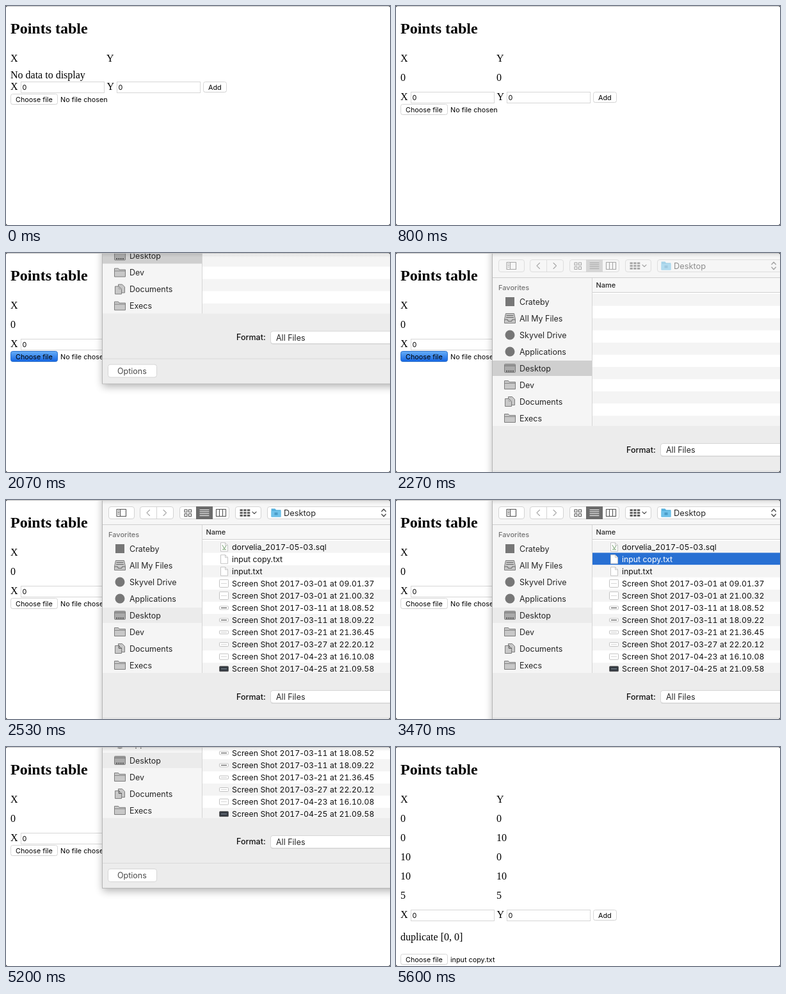
Animation, 600 px wide and 342 px high, one loop 7.34 s. Source, as an HTML page:

```html
<!DOCTYPE html>
<html lang="en">
<head>
<meta charset="utf-8">
<title>Points table</title>
<style>
html, body { margin: 0; width: 100%; height: 100%; overflow: hidden; background: #fff; }
svg { display: block; width: 100vw; height: 100vh; }
text { white-space: pre; }
.serif { font: 16px "Liberation Serif", "Times New Roman", serif; }
.serif .title { font-size: 24px; font-weight: bold; }
.ui { font: 10.8px Inter, sans-serif; }
.sheet { font: 12.5px Inter, sans-serif; fill: #262626; }
.files { font-size: 12.3px; fill: #111; }
.num { font-variant-numeric: tabular-nums; }
.small { font-size: 11px; }
.box { fill: #fff; stroke: #d6d6d6; }
.btn { fill: #fff; stroke: #d6d6d6; }
.pressed .btn { fill: url(#blue); stroke: #2a70cc; }
.line { fill: none; stroke: #555; stroke-width: 1.1; stroke-linecap: round; stroke-linejoin: round; }
.icon { fill: #c8c8c8; stroke: #7c7c7c; }
.tool { fill: #fff; stroke: #d3d3d3; }
.mid { fill: #6c6c6c; }
.midline { stroke: #fff; }
.side { fill: #ebebeb; }
.idle .tool { fill: #f6f6f6; stroke: #dedede; }
.idle .mid { fill: #d6d6d6; }
.idle .line { stroke: #a6a6a6; }
.idle .dim { opacity: .5; }
.idle .side { fill: #cfcfcf; }
</style>
</head>
<body>
<svg id="stage" viewBox="0 0 600 342" preserveAspectRatio="none"></svg>
<script>
const LOOP = 7340, SHEET_TRAVEL = 385, ROW = 19.05;

const rect = (x, y, w, h, attrs = '') =>
  `<rect x="${x}" y="${y}" width="${w}" height="${h}" ${attrs}/>`;
const text = (x, y, s, attrs = '') => `<text x="${x}" y="${y}" ${attrs}>${s}</text>`;
const path = (d, attrs = 'class="line"') => `<path d="${d}" ${attrs}/>`;
const group = (attrs, ...parts) => `<g ${attrs}>${parts.join('')}</g>`;
const alignDigits = s => s.replace(/\d+/g, '<tspan class="num">$&</tspan>');
const button = (id, x, y, w, label) =>
  group(`id="${id}"`,
    rect(x + .5, y + 1.2, w - 1, 16, 'rx="3" fill="#000" opacity=".1"'),
    rect(x + .5, y + .5, w - 1, 16, 'rx="3" class="btn"'),
    text(x + 8, y + 13, label));
const pair = (y, a, b) => text(7, y, a) + text(157, y, b);

function pageMarkup() {
  const field = x => rect(x + .5, 118.5, 130, 17, 'class="box"');
  const rows = [[0, 10], [10, 0], [10, 10], [5, 5]];
  return group('class="serif"',
      text(7, 43, 'Points table', 'class="title"'),
      pair(87, 'X', 'Y'),
      text(7, 113, 'No data to display', 'id="empty"'),
      group('id="first"', pair(117, 0, 0)),
      group('id="loaded"',
        ...rows.map(([x, y], i) => pair(147 + 30 * i, x, y)),
        text(7, 302, 'duplicate [0, 0]'))) +
    group('id="form"',
      group('class="serif"', text(7, 131, 'X'), text(157.5, 131, 'Y')),
      field(23), field(173),
      group('class="ui"', text(25.5, 131, '0'), text(175.5, 131, '0'),
        button('add', 308, 118, 37, 'Add'))) +
    group('id="picker" class="ui"',
      button('choose', 7, 137, 74, 'Choose file'),
      text(85, 150, 'No file chosen', 'id="chosen"'));
}

function toolbarMarkup() {
  const frame = (x, w) => rect(x + .5, 10.5, w, 19, 'rx="3.5" class="tool"');
  const cells = [0, 1, 2, 3].map(i =>
    rect(279 + i % 2 * 6.5, 15 + (i >> 1) * 6.5, 4, 4, 'class="line"')).join('');
  const grid = Array.from({ length: 9 }, (_, i) =>
    rect(365.5 + i % 3 * 5.7, 14.5 + Math.floor(i / 3) * 4.2, 4.4, 2.8, 'fill="#555" class="dim"')).join('');
  return frame(160, 40) + rect(173, 14.5, 14.5, 11, 'class="line"') +
    path('M178.5 14.5v11M175 17h1.8M175 19.5h1.8M175 22h1.8') +
    frame(209, 52) + path('M235.5 10.5v19', 'class="tool"') +
    path('M224.5 15.5l-4.5 4.5 4.5 4.5M246 15.5l4.5 4.5-4.5 4.5', 'class="line" style="stroke:#a8a8a8"') +
    frame(271, 77) + cells + rect(297, 10, 26, 20, 'class="mid"') +
    path('M303 15.5h14M303 18.5h14M303 21.5h14M303 24.5h14', 'class="line midline"') +
    rect(328.5, 14.5, 15, 11, 'class="line"') + path('M333.5 14.5v11M338.5 14.5v11') +
    frame(358, 40) + grid + path('M385 18.5l3 3 3-3') +
    frame(408, 200) +
    group('class="dim"',
      path('M414.5 13.5h6l1.5 2h7.5v11h-15z', 'fill="#55afdc"'),
      rect(414.5, 17, 15, 9.5, 'rx="1" fill="#6fc2ea"'),
      rect(419.5, 19.5, 5, 4, 'fill="#4a9cc8"'),
      text(434, 24.6, 'Desktop', 'style="font-size:12.8px"')) +
    path('M587 17.8l3.2-3.6 3.2 3.6M587 22.2l3.2 3.6 3.2-3.6', 'class="line" style="stroke-width:1.5"');
}

function sidebarMarkup() {
  const dot = '<circle cx="178" cy="0" r="7.5" fill="#777"/>';
  const square = rect(171, -7, 14, 14, 'fill="#777"');
  const folder = path('M169.5-6.5h6l1.5 2h9.5v11h-17z', 'class="icon"') + path('M170-2.5h16', 'stroke="#858585"');
  const tray = path('M171.5-7.5h13l2 9v6h-17v-6z', 'class="icon"') +
    path('M173-4.5h10M172.5-1.5h11M170 2h4l1.5 2.5h5L182 2h4', 'class="line" style="stroke:#666"');
  const screen = rect(169.5, -6.5, 17, 13, 'rx="1" class="icon" style="fill:#aaa"') +
    path('M170-4h16', 'stroke="#666"') + path('M172 4.5h12', 'stroke="#555" stroke-width="2" stroke-dasharray="2 1.3"');
  const sheets = path('M175.5-7.5h6l4 4v9h-10z', 'class="icon"') +
    path('M170.5-4.5h6l4 4v8h-10z', 'class="icon"') + path('M176.5-4.5v4h4', 'class="line"');
  const items = [
    ['Crateby', square], ['All My Files', tray], ['Skyvel Drive', dot], ['Applications', dot],
    ['Desktop', screen], ['Dev', folder], ['Documents', sheets], ['Execs', folder]];
  return rect(151, 39, 155, 231, 'fill="#f5f5f5"') +
    text(160, 58, 'Favorites', 'class="small" fill="#747474" font-weight="500"') +
    rect(151, 168, 155, 24, 'class="side"') +
    items.map(([name, icon], i) =>
      group(`transform="translate(0 ${76 + 26 * i})"`, icon, text(193, 4.6, name))).join('');
}

function listMarkup() {
  const shots = ['03-01 09.01.37', '03-01 21.00.32', '03-11 18.08.52', '03-11 18.09.22',
    '03-21 21.36.45', '03-27 22.20.12', '04-23 16.10.08', '04-25 21.09.58'];
  const names = ['dorvelia_2017-05-03.sql', 'input copy.txt', 'input.txt',
    ...shots.map(s => `Screen Shot 2017-${s.replace(' ', ' at ')}`)];
  const heights = [12, 12, 5, 5, 5, 6, 9, 8];
  const doc = path('M335.5-6.5h7l4 4v9.5h-11z', 'fill="#fff" stroke="#c4c4c4"') +
    path('M342.5-6.5v4h4', 'fill="none" stroke="#c4c4c4"');
  const thumb = i => {
    const h = heights[i], last = i === 7;
    const mark = i === 2 || i === 3 ? '#444' : last ? '#8793a0' : '#d5d5d5';
    return rect(333.5, -h / 2, 14, h, `rx="1" fill="${last ? '#343a42' : '#fff'}" stroke="${last ? '#666' : '#c2c2c2'}"`) +
      path('M336 0h9', `stroke="${mark}"`);
  };
  const stripes = names.map((_, i) =>
    rect(307, 63.7 + i * ROW, 293, ROW, `fill="${i % 2 ? '#fff' : '#f4f4f4'}"`)).join('');
  const rows = names.map((name, i) =>
    group(`transform="translate(0 ${73.2 + i * ROW})"`,
      i < 3 ? doc : thumb(i - 3),
      i ? '' : path('M338-3l3 6 3-5M338 4h6', 'fill="none" stroke="#6f9a68"'),
      text(353, 4.5, alignDigits(name), i === 1 ? 'id="picked"' : ''))).join('');
  return rect(307, 39, 293, 235, 'fill="#fff"') + stripes +
    rect(307, 39, 293, 22, 'fill="#f7f7f7"') +
    text(312.5, 54, 'Name', 'class="small" font-weight="500"') +
    path('M307 61.5H600', 'stroke="#d0d0d0"') +
    group('id="files" class="files"',
      rect(307, 82.4, 293, 18.8, 'id="mark" fill="#2870d3"'), rows);
}

function sheetMarkup() {
  return rect(151, -20, 480, 399, 'fill="#000" opacity=".3" filter="url(#soft)"') +
    rect(150.5, -20, 480, 399.5, 'fill="#ececec" stroke="#b5b5b5"') +
    rect(151, -20, 460, 58, 'fill="#f6f6f6"') +
    toolbarMarkup() + sidebarMarkup() + listMarkup() +
    path('M151 38.5H600', 'stroke="#cfcfcf"') +
    path('M306.5 39V270', 'stroke="#d6d6d6"') +
    rect(151, 270, 460, 109, 'fill="#ececec"') +
    text(360, 311.5, 'Format:', 'font-weight="500" fill="#111"') +
    rect(413.5, 298, 200, 20, 'rx="3.5" fill="#000" opacity=".12"') +
    rect(413.5, 297.5, 200, 19.5, 'rx="3.5" class="box"') + text(422, 312, 'All Files') +
    path('M151 340.5H600', 'stroke="#dadada"') +
    rect(159.5, 349.5, 76, 20, 'rx="3.5" class="box"') +
    text(174, 364, 'Options', 'fill="#4a4a4a"');
}

document.getElementById('stage').innerHTML = `<defs>
  <linearGradient id="blue" x2="0" y2="1"><stop stop-color="#66aef8"/><stop offset="1" stop-color="#1465e2"/></linearGradient>
  <linearGradient id="shade" x2="0" y2="1"><stop stop-opacity=".1"/><stop offset="1" stop-opacity="0"/></linearGradient>
  <filter id="soft" x="-20%" y="-20%" width="140%" height="140%"><feOffset dy="5"/><feGaussianBlur stdDeviation="6.5"/></filter>
  </defs>` + rect(0, 0, 600, 342, 'fill="#fff"') + pageMarkup() +
  group('id="sheet" class="sheet"', sheetMarkup()) +
  rect(151, 0, 449, 7, 'id="lip" fill="url(#shade)"') +
  rect(0, 0, 600, 1, 'fill="#c4c4c4"') +
  path('M0 0h2L0 2zM600 0h-2l2 2zM0 342h2l-2-2zM600 342h-2l2-2z', 'fill="#444"');

const el = id => document.getElementById(id);
const show = (id, on) => el(id).setAttribute('display', on ? 'inline' : 'none');
const shift = (id, y) => el(id).setAttribute('transform', `translate(0 ${y})`);
const ease = (t, from, to) => {
  const p = Math.min(1, Math.max(0, (t - from) / (to - from)));
  return .5 - .5 * Math.cos(Math.PI * p);
};

function draw(ms) {
  const tick = Math.floor((ms + 7) * 3 / 200);
  const added = tick >= 12, loaded = tick >= 84;
  show('empty', !added);
  show('first', added);
  show('loaded', loaded);
  shift('form', loaded ? 136 : added ? 16 : 0);
  shift('picker', loaded ? 186 : added ? 16 : 0);
  el('add').classList.toggle('pressed', tick === 11);
  el('choose').classList.toggle('pressed', tick >= 23 && tick < 37);
  el('chosen').textContent = loaded ? 'input copy.txt' : 'No file chosen';

  const open = tick >= 29 && tick < 81;
  show('sheet', open);
  show('lip', open);
  shift('sheet', SHEET_TRAVEL * (ease(tick, 28.2, 33.5) - 1 - ease(tick, 75.6, 81)));
  el('sheet').classList.toggle('idle', tick < 37);
  show('files', tick >= 36);
  show('mark', tick >= 52);
  el('picked').setAttribute('fill', tick >= 52 ? '#fff' : '#111');
}

const start = performance.now();
function loop() {
  draw((performance.now() - start) % LOOP);
  requestAnimationFrame(loop);
}
loop();
</script>
</body>
</html>
```
